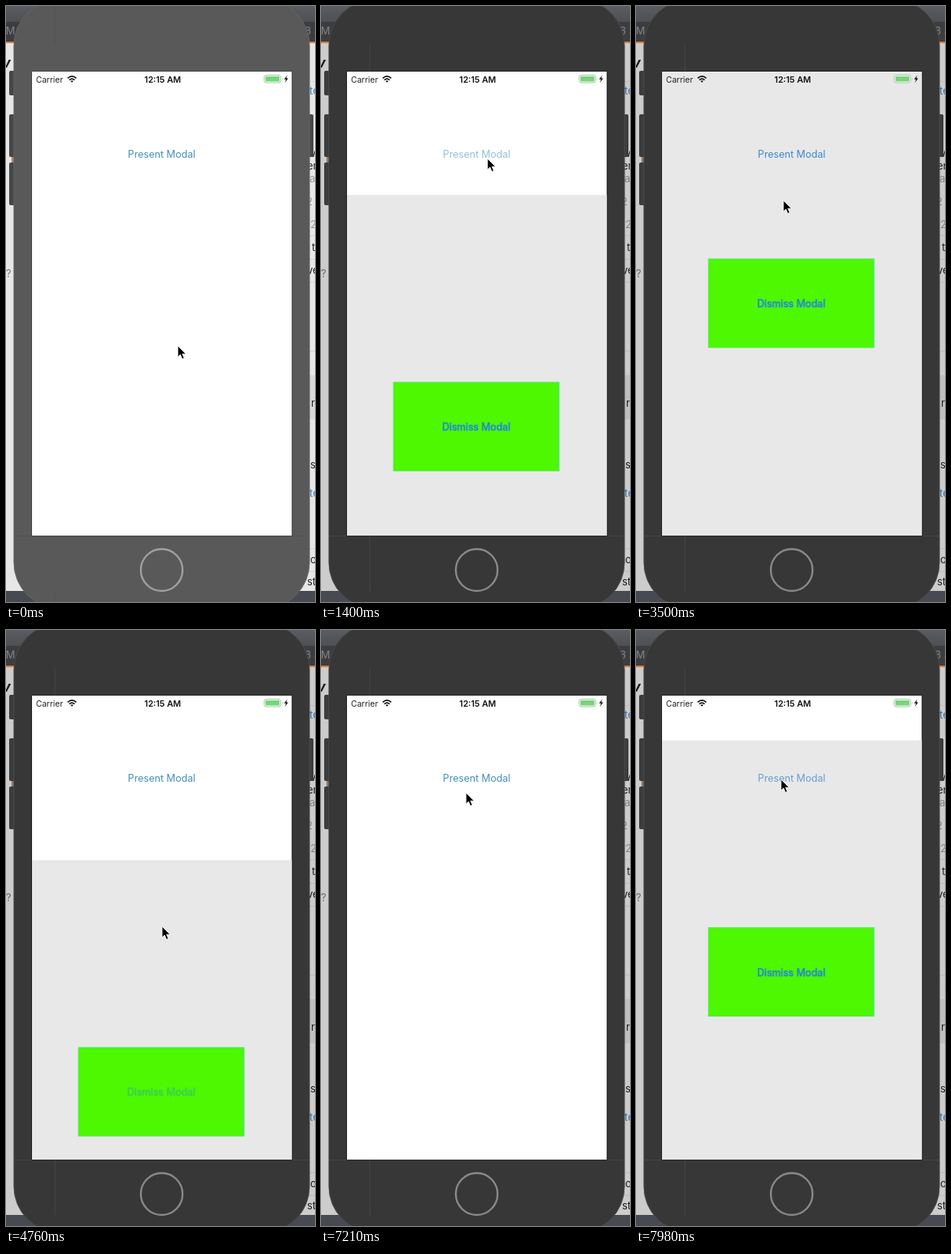
Recreate the animation shown at these times as an HTML page. Size 392 by 754 pixels, loop 8 s.

```html
<!DOCTYPE html>
<html lang="en">
<head>
<meta charset="utf-8">
<title>Modal presentation</title>
<style>
  html, body { margin: 0; width: 100%; height: 100%; overflow: hidden; background: #e9e9e9; }
  svg { display: block; width: 392px; height: 754px; font-family: Inter, Roboto, sans-serif; }
  .label { font-size: 12.6px; text-anchor: middle; }
</style>
</head>
<body>
<svg viewBox="0 0 392 754">
  <defs>
    <clipPath id="screen"><rect x="33" y="83" width="330" height="587"/></clipPath>
    <linearGradient id="toolbar" x2="0" y2="1">
      <stop offset="0" stop-color="#595c61"/><stop offset="1" stop-color="#4e5054"/>
    </linearGradient>
  </defs>

  <!-- Page behind the device -->
  <rect width="392" height="754" fill="#ededed"/>
  <rect width="392" height="20" fill="url(#toolbar)"/>
  <rect y="20" width="392" height="25" fill="#3c3d40"/>
  <rect y="45" width="392" height="2" fill="#df7b31"/>
  <rect x="380" y="467" width="12" height="56" fill="#dedede"/>
  <path d="M380 95.500h12M380 290.500h12M380 320.500h12M380 349.500h12M380 436.500h12M380 686.500h12M380 715.500h12" stroke="#d8d8d8"/>
  <rect y="740" width="392" height="14" fill="#484a52"/>
  <rect x="7" y="191" width="4" height="7" fill="#b08a70"/>
  <g id="pageText" font-size="13"></g>
  <rect id="shade" y="47" width="392" height="693" fill="#000"/>

  <!-- Device -->
  <g id="buttons">
    <rect x="4" y="82" width="9" height="31" rx="2"/>
    <rect x="4" y="137" width="9" height="54" rx="2"/>
    <rect x="4" y="198" width="9" height="54" rx="2"/>
    <rect x="382" y="137" width="8" height="54" rx="2"/>
  </g>
  <rect id="body" x="10" y="-8" width="375" height="770" rx="58" stroke-width="1"/>
  <path id="seams" fill="none" stroke="#fff" stroke-opacity=".07"/>
  <circle id="home" cx="197.500" cy="713.500" r="26.500" fill="none" stroke-width="2.400"/>
  <rect id="bezel" x="32.500" y="82.500" width="331" height="588" fill="#111"/>
  <rect x="33" y="83" width="329.500" height="587" fill="#fff"/>

  <!-- Screen -->
  <g clip-path="url(#screen)">
    <g id="modal">
      <rect x="33" y="83" width="329.500" height="587" fill="#e8e8e8"/>
      <rect x="91.500" y="319.500" width="211" height="113" fill="#49ee45"/>
      <rect x="92.500" y="321" width="207.500" height="110.500" fill="#4df800"/>
      <text id="dismiss" class="label" x="197" y="381" fill="#2485b8" stroke="#3cc878" stroke-width="1.500" paint-order="stroke">Dismiss Modal</text>
    </g>
    <text id="present" class="label" x="197.500" y="192">Present Modal</text>
  </g>
  <text x="38" y="96.500" font-size="10.500" fill="#222">Carrier</text>
  <text x="198.800" y="96.500" font-size="10.800" font-weight="600" text-anchor="middle" fill="#111">12:15 AM</text>
  <g fill="none" stroke="#111" stroke-width="1.700">
    <path d="M78.300 91.300Q83.700 86.300 89.100 91.300M80.400 93.600Q83.700 90.600 87 93.600"/>
    <path d="M82 94.900Q83.700 93.700 85.400 94.900L83.700 96.800Z" fill="#111" stroke="none"/>
  </g>
  <rect x="327.500" y="87.500" width="21" height="9.500" rx="2.500" fill="#fff" stroke="#9fc8a2"/>
  <rect x="329" y="89" width="18" height="6.500" rx="1" fill="#78d579"/>
  <path d="M350 90.500q1.500 1.700 0 3.500z" fill="#9fc8a2"/>
  <path d="M356.800 87.500L352.800 92.800H355.200L353.800 97L358 91.600H355.500Z" fill="#111"/>

  <path id="cursor" d="M0 0V14L3.200 11L5.600 16.500L8 15.400L5.700 10.200H10.200Z" fill="#000" stroke="#fff" stroke-width=".8"/>
</svg>
<script>
const el = id => document.getElementById(id);
const set = (id, attrs) => Object.entries(attrs).forEach(([k, v]) => el(id).setAttribute(k, v));
const clamp = x => Math.max(0, Math.min(1, x));

const LOOP = 8000, STEP = 70, SLIDE = 587;
const ACTIVATE = 840, PRESENT_1 = 1237, DISMISS = 4682, PRESENT_2 = 7734;

// time, x, y of the pointer tip
const route = [
  [0, 218, 430], [210, 218, 430], [560, 212, 193], [1680, 211, 193],
  [2310, 187, 246], [3780, 187, 246], [4410, 198, 375], [5390, 198, 375],
  [5600, 195, 569], [5810, 195, 569], [6090, 192, 756], [6230, 192, 756],
  [6860, 184, 206], [7210, 184, 206], [7420, 184, 189], [8000, 184, 189]
];

// label, x, baseline, colour, weight
const pageText = [
  ["/M", -5, 36, "#858585"], ["3 S", 379, 36, "#858585"],
  ["v", -5, 78, "#222", 700], ["?", 0, 343, "#777"],
  ["te", 385, 112, "#3b82c4"], ["v", 386, 191, "#222"], ["er", 382, 207, "#222"],
  ["a", 385, 223, "#999"], ["2", 381, 252, "#999"], ["2", 386, 281, "#999"],
  ["t", 388, 310, "#222"], ["ve", 382, 339, "#222"], ["r", 387, 507, "#222"],
  ["s", 386, 585, "#222"], ["te", 385, 621, "#3b82c4"],
  ["o", 386, 705, "#222"], ["st", 382, 733, "#222"]
];
el("pageText").innerHTML = pageText.map(([s, x, y, fill, weight = 400]) =>
  `<text x="${x}" y="${y}" fill="${fill}" font-weight="${weight}"${s === "v" && weight > 400 ? ' font-size="18" font-style="italic"' : ""}>${s}</text>`).join("");

function pointer(t) {
  const i = route.findIndex(p => p[0] > t);
  const [t0, x0, y0] = route[i - 1], [t1, x1, y1] = route[i];
  const p = (t - t0) / (t1 - t0), e = p * p * (3 - 2 * p);
  return [x0 + (x1 - x0) * e, y0 + (y1 - y0) * e];
}

// Critically damped spring: 1 at the start, 0 at rest
function spring(ms) {
  const x = Math.max(0, ms) * 0.016;
  return (1 + x) * Math.exp(-x);
}

function modalOffset(t) {
  let rest;
  if (t < DISMISS) rest = spring(t - PRESENT_1);
  else if (t < PRESENT_2) rest = 1 - spring(t - DISMISS);
  else rest = spring(t - PRESENT_2);
  return SLIDE * rest;
}

// A pressed label dims, then fades back after release
function pressAlpha(t, release) {
  return t < release - 100 ? 1 : 0.2 + 0.8 * clamp((t - release) / 350);
}

function draw(t) {
  const active = t >= ACTIVATE, offset = modalOffset(t);
  set("body", { fill: active ? "#373737" : "#595959", stroke: active ? "#4b4b4b" : "#656565" });
  set("buttons", { fill: active ? "#3c3c3c" : "#474747" });
  set("home", { stroke: active ? "#898989" : "#a0a0a0" });
  set("shade", { opacity: active ? 0.14 : 0.025 });
  set("bezel", { opacity: active ? 1 : 0.45 });
  set("seams", {
    d: "M10 670.500H385" + (active ? "M62 48V83M62 670V740" : "M62 0V48M62 740V754"),
    stroke: active ? "#fff" : "#000"
  });
  set("modal", { transform: `translate(0 ${offset.toFixed(2)})` });
  set("present", {
    fill: 83 + offset < 188 ? "#3f87cc" : "#458fb8",
    opacity: pressAlpha(t, t < DISMISS ? PRESENT_1 : PRESENT_2)
  });
  set("dismiss", { opacity: pressAlpha(t, DISMISS) });
  set("cursor", { transform: `translate(${pointer(t).map(v => v.toFixed(1)).join(" ")})` });
}

function tick() {
  const t = performance.now() % LOOP;
  draw(Math.floor(t / STEP) * STEP);
  requestAnimationFrame(tick);
}
tick();
</script>
</body>
</html>
```
